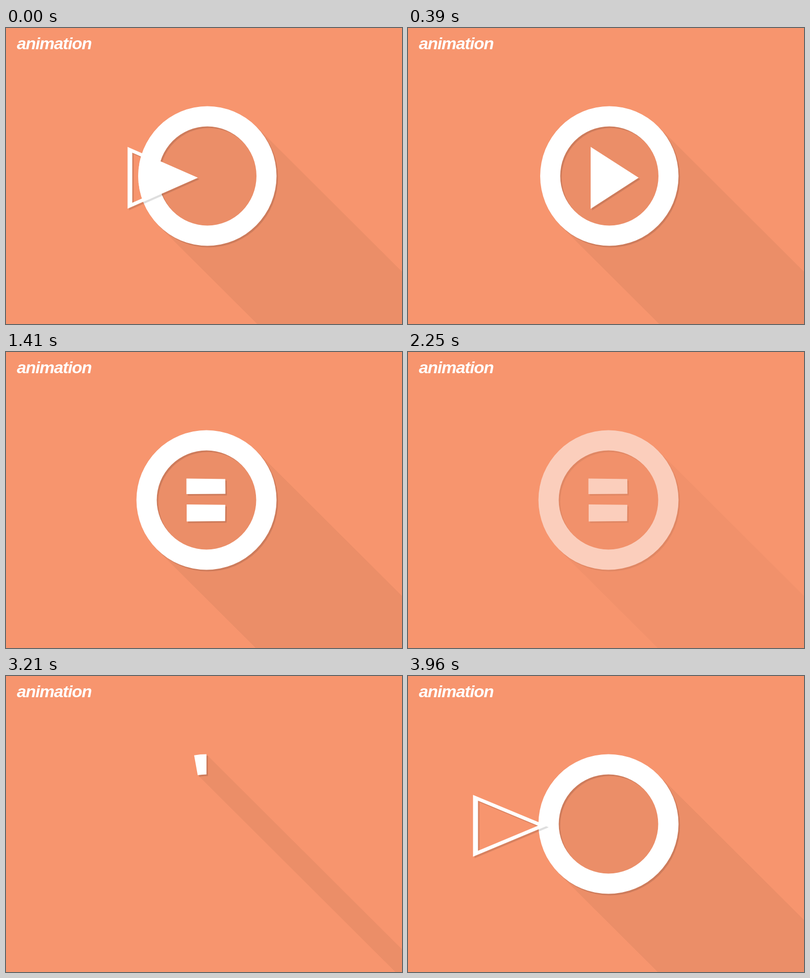
Write an HTML page with a canvas that moves like this. It is 800x600 px and loops after 3990 ms.

```html
<!DOCTYPE html>
<html lang="en">
<head>
<meta charset="utf-8">
<title>animation</title>
<style>
  html, body { margin: 0; width: 100%; height: 100%; overflow: hidden; background: #f7956e; }
  canvas { position: absolute; left: 0; top: 0; width: 800px; height: 600px; }
  .title {
    position: absolute; left: 22px; top: 14px;
    font: italic bold 34px/34px "Liberation Sans", Arial, sans-serif;
    letter-spacing: -1.1px; color: #fff; white-space: nowrap;
  }
</style>
</head>
<body>
<canvas id="stage" width="800" height="600"></canvas>
<div class="title">animation</div>
<script>
const W = 800, H = 600, LOOP = 3990;
const CX = 405, CY = 300, OUTER = 141.5, INNER = 100.5, RIGHT = CX + OUTER;
const TRI = { width: 97, top: 241, mid: 303.6, bottom: 366.4, stroke: 6.5 };
const BARS = [
  [[364.5, 256.5], [443, 257.5], [443.3, 287.5], [364.5, 288]],
  [[365, 309], [443, 309.8], [442.7, 342.7], [365, 343.5]]
];

const stage = document.getElementById('stage').getContext('2d');
const makeLayer = () => {
  const c = document.createElement('canvas');
  c.width = W;
  c.height = H;
  return c.getContext('2d');
};
const art = makeLayer(), cast = makeLayer(), mark = makeLayer();

const clamp = x => Math.max(0, Math.min(1, x));
const mix = (a, b, p) => a + (b - a) * p;
const smooth = x => x * x * (3 - 2 * x);

// Symmetric ease, the same curve as cubic-bezier(a, 0, 1 - a, 1).
function ease(x, a) {
  x = clamp(x);
  let lo = 0, hi = 1;
  for (let i = 0; i < 30; i++) {
    const s = (lo + hi) / 2, r = 1 - s;
    if (3 * r * r * s * a + 3 * r * s * s * (1 - a) + s * s * s < x) lo = s;
    else hi = s;
  }
  return smooth(lo);
}

function wipe(g) {
  g.setTransform(1, 0, 0, 1, 0, 0);
  g.clearRect(0, 0, W, H);
}

// The ring's left side is pushed in by the arriving triangle.
function squeeze(g, push) {
  g.translate(RIGHT, 0);
  g.scale(1 - push / (2 * OUTER), 1);
  g.translate(-RIGHT, 0);
}

function drawRing(g, sweep, push) {
  if (sweep <= 0) return;
  const full = sweep > 0.9995;
  const a = -Math.PI / 2, b = a - (full ? 1 : sweep) * Math.PI * 2;
  g.save();
  squeeze(g, push);
  g.beginPath();
  g.arc(CX, CY, OUTER, a, b, true);
  if (full) g.closePath();
  if (full) g.moveTo(CX, CY - INNER);
  g.arc(CX, CY, INNER, b, a, false);
  g.closePath();
  g.fillStyle = '#fff';
  g.fill('evenodd');
  g.restore();
}

function drawLongShadow(sweep, push) {
  wipe(cast);
  drawRing(cast, sweep, push);
  for (let d = 1; d < W; d *= 2) cast.drawImage(cast.canvas, d, d);
  art.globalAlpha = 0.046;
  art.globalCompositeOperation = 'source-over';
  cast.globalCompositeOperation = 'source-in';
  cast.fillStyle = '#000';
  cast.fillRect(0, 0, W, H);
  cast.globalCompositeOperation = 'source-over';
  art.drawImage(cast.canvas, 0, 0);
  art.globalAlpha = 1;
}

function withShadow(draw) {
  art.save();
  art.shadowColor = 'rgba(0,0,0,0.13)';
  art.shadowOffsetX = 3;
  art.shadowOffsetY = 3.2;
  art.shadowBlur = 1;
  draw();
  art.restore();
}

// Two halves of the triangle, each turning into a bar.
function solidPath(g, left, width, morph) {
  const tip = [left + width, TRI.mid], base = [left, TRI.mid];
  const halves = [
    [[left, TRI.top], tip, tip, base],
    [base, tip, tip, [left, TRI.bottom]]
  ];
  g.beginPath();
  halves.forEach((half, i) => {
    half.forEach(([x, y], j) => {
      const [bx, by] = BARS[i][j];
      g[j ? 'lineTo' : 'moveTo'](mix(x, bx, morph), mix(y, by, morph));
    });
    g.closePath();
  });
}

function drawOutline(g, left, width) {
  const h = (TRI.bottom - TRI.top) / 2, w = TRI.width;
  const inR = w * h / (h + Math.hypot(w, h));
  const k = 1 - TRI.stroke / 2 / inR;
  g.save();
  g.translate(left, TRI.mid);
  g.scale(width / w, 1);
  g.beginPath();
  g.moveTo(TRI.stroke / 2, -h * k);
  g.lineTo(mix(inR, w, k), 0);
  g.lineTo(TRI.stroke / 2, h * k);
  g.closePath();
  g.lineWidth = TRI.stroke;
  g.lineJoin = 'miter';
  g.strokeStyle = '#fff';
  g.stroke();
  g.restore();
}

function drawMark(t, push) {
  const p = ease((t + 330) / 594, 0.87);
  if (p <= 0) return;
  const left = mix(-160, 369, p);
  const width = TRI.width + 106 * Math.sqrt(p * (1 - p));
  const morph = ease((t - 580) / 820, 0.7);
  wipe(mark);
  if (p < 0.999) drawOutline(mark, left, width);
  // Solid only where it lies within the ring.
  mark.save();
  mark.save();
  squeeze(mark, push);
  mark.beginPath();
  mark.arc(CX, CY, OUTER, 0, Math.PI * 2);
  mark.restore();
  mark.clip();
  solidPath(mark, left, width, morph);
  mark.fillStyle = '#fff';
  mark.fill();
  mark.restore();
  withShadow(() => art.drawImage(mark.canvas, 0, 0));
}

function fade(t) {
  if (t < 2010 || t >= 3060) return 1;
  if (t >= 2610) return 0.095;
  return 1 - 0.115 * Math.min(7, Math.floor((t - 2010) / 80) + 1);
}

function render(t) {
  const redraw = t >= 3060;
  const sweep = redraw ? ease((t - 3060) / 840, 0.7) : 1;
  const hit = redraw ? t - LOOP : t;
  const push = 4.2 * smooth(clamp((hit + 30) / 40)) * (1 - smooth(clamp((hit - 200) / 740)));

  wipe(art);
  drawLongShadow(sweep, push);
  withShadow(() => drawRing(art, sweep, push));
  drawMark(hit, push);

  stage.globalAlpha = 1;
  stage.fillStyle = '#f7956e';
  stage.fillRect(0, 0, W, H);
  stage.globalAlpha = fade(t);
  stage.drawImage(art.canvas, 0, 0);
}

function tick() {
  render(performance.now() % LOOP);
  requestAnimationFrame(tick);
}
tick();
</script>
</body>
</html>
```
